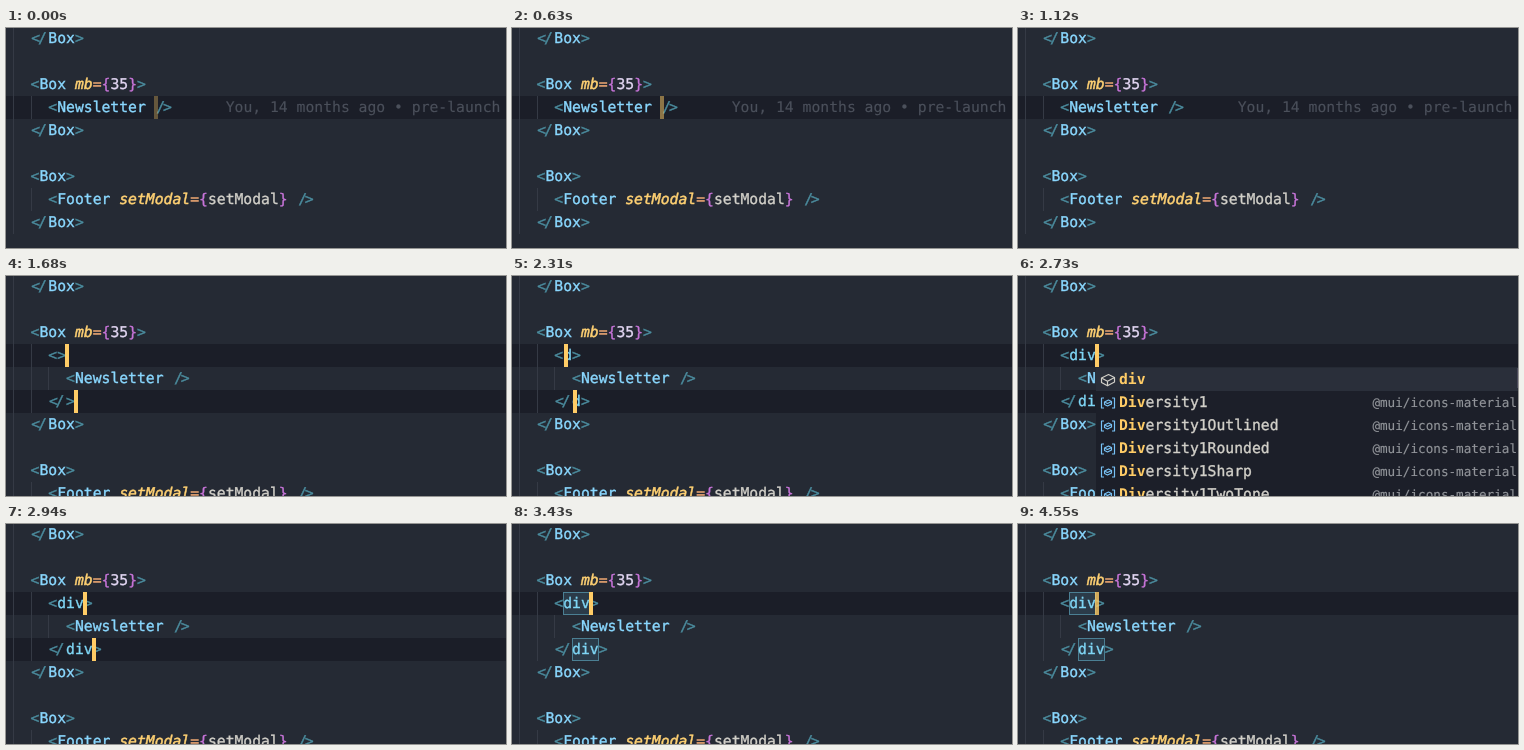
Write an HTML page that moves like this. It is 500x220 px and loops after 4620 ms.

```html
<!DOCTYPE html>
<html lang="en">
<head>
<meta charset="utf-8">
<title>Wrapping a component</title>
<style>
  html, body { margin: 0; width: 100%; height: 100%; overflow: hidden; background: #252a34; }
  #stage {
    position: relative; width: 500px; height: 220px; overflow: hidden;
    background: #252a34; color: #d2d0c9;
    font: 14.73px/23px "DejaVu Sans Mono", "Noto Sans Mono", monospace;
    text-rendering: geometricPrecision; font-variant-ligatures: none;
    -webkit-text-stroke: .35px;
  }
  #stage div, #stage svg { position: absolute; white-space: pre; box-sizing: border-box; }
  .band { left: 0; width: 500px; height: 23px; background: #1b1e28; }
  .guide { width: 1px; background: #353a45; }
  .punct { color: #4b8c9e; }
  .punct u { position: relative; text-decoration: none; }
  .brace { color: #c774d8; }
  .op { color: #eba672; }
  .comp { color: #8ad8ff; }
  .tag { color: #7fd6f5; }
  .attr { color: #ffd173; font-style: italic; -webkit-text-stroke: .5px; }
  .num { color: #e2d6f2; }
  .blame { color: #4b505b; -webkit-text-stroke: .15px; }
  .word { height: 23px; width: 27px; border: 1px solid #4b7f93; background: #2b3b49; }
  .caret { width: 4px; height: 23px; background: #ffcc66; }
  .popup { top: 92px; width: 431px; height: 140px; background: #1c1f29; }
  .item { left: 0; width: 431px; height: 23px; }
  .item.on { background: #2a2f3a; }
  .item svg { left: 4px; top: 4px; width: 16px; height: 16px; fill: none; stroke-width: 1.2; stroke-linejoin: round; }
  .label { left: 23px; }
  .label b { color: #ffcc66; -webkit-text-stroke: 0; }
  .detail { right: 10px; color: #92959a; font-size: 12.65px; -webkit-text-stroke: .15px; }
  .thumb { right: 0; top: 0; width: 10px; height: 20px; background: #4b4a5b; }
</style>
</head>
<body>
<div id="stage"></div>
<script>
const LOOP = 4620, TICK = 70, CHAR = 8.868, LEFT = 24.6, ROW = 23;
const stage = document.getElementById('stage');

// Each table holds [start in ms, value].
const tagName = [[0, null], [1610, ''], [2310, 'd'], [2450, 'di'], [2660, 'div']];
const caretCol = [[0, 12], [1610, 8], [1680, 2], [1750, 1], [2310, 1.2], [2380, 2],
  [2450, 2.25], [2520, 2.85], [2590, 3], [2660, 3.25], [2730, 4]];
const caretAlpha = [[0, .33], [70, 0], [560, .1], [630, .5], [700, .9], [770, 1],
  [980, .87], [1050, .33], [1120, 0], [1610, 1], [3780, .9], [3850, .5], [3920, .1],
  [3990, 0], [4480, .3], [4550, .8]];
const twoCarets = [[0, false], [1680, true], [3150, false]];
const popupKind = [[0, null], [2520, 'di'], [2730, 'div'], [2940, null]];
const wordBoxes = [[0, false], [3430, true]];

const PACKAGE = '@mui/icons-material';
const WHITE = '#d2d0c9', PURPLE = '#b180d7', BLUE = '#78c2f5';
const popups = {
  di: { col: 3, items: [['dialog', 'cube', WHITE], ['dispatchEvent', 'method', PURPLE],
    ['div', 'cube', BLUE], ...['', 'Outlined', 'Rounded'].map(s => icon('DialerSip' + s))] },
  div: { col: 4, items: [['div', 'cube', WHITE],
    ...['', 'Outlined', 'Rounded', 'Sharp', 'TwoTone'].map(s => icon('Diversity1' + s))] }
};
const shapes = {
  cube: 'M1.5 6 8.5 2.5 14.5 5.5V10L7.5 13.8 1.5 10.5ZM1.5 6 7.5 9.2 14.5 5.5M7.5 9.2V13.8',
  method: 'M8 1.8 13.5 5V11L8 14.2 2.5 11V5ZM2.5 5 8 8 13.5 5M8 8V14.2',
  value: 'M4 3H1.5V13H4M12 3H14.5V13H12M4.5 7 8.5 5 11.5 6.5V9L7.5 11 4.5 9.5ZM4.5 7 7.5 8.5 11.5 6.5'
};

function icon(name) { return [name, 'value', BLUE, PACKAGE]; }

function at(table, t) {
  let value;
  for (const [start, v] of table) if (start <= t) value = v;
  return value;
}

const x = col => LEFT + col * CHAR;
const y = row => row * ROW - 1;
const box = (cls, style, inner = '') => `<div class="${cls}" style="${style}">${inner}</div>`;
const place = (col, row) => `left:${x(col)}px;top:${y(row)}px;`;
const esc = s => s.replace(/</g, '&lt;').replace(/>/g, '&gt;');

const kinds = ['punct', 'brace', 'op', 'comp', 'tag', 'attr', 'num'];
const syntax = /(<\/|\/>|<|>)|([{}])|(=)|((?<=<\/?)[A-Z]\w*)|((?<=<\/?)[a-z]+)|(\w+(?==))|(\d+)/g;

// Paired punctuation sits closer together, as in a ligature.
function tight(s) {
  if (s.length < 2) return esc(s);
  const shift = s === '</' ? [.6, -1.6] : [1.6, -.6];
  return [...s].map((c, i) => `<u style="left:${shift[i]}px">${esc(c)}</u>`).join('');
}

function paint(text) {
  return text.replace(syntax, (m, ...groups) => {
    const i = groups.slice(0, kinds.length).findIndex(g => g !== undefined);
    return `<span class="${kinds[i]}">${i ? m : tight(m)}</span>`;
  });
}

function codeLines(tag) {
  const inner = tag === null
    ? [[2, '<Newsletter />']]
    : [[2, `<${tag}>`], [4, '<Newsletter />'], [2, `</${tag}>`]];
  return [[0, '</Box>'], [0, ''], [0, '<Box mb={35}>'], ...inner, [0, '</Box>'], [0, ''],
    [0, '<Box>'], [2, '<Footer setModal={setModal} />'], [0, '</Box>']];
}

function drawItem([name, shape, color, detail], i, typed) {
  return box('item' + (i ? '' : ' on'), `top:${i * ROW}px`,
    `<svg viewBox="0 0 16 16" stroke="${color}"><path d="${shapes[shape]}"/></svg>` +
    box('label', '', `<b>${name.slice(0, typed)}</b>${name.slice(typed)}`) +
    (detail ? box('detail', '', detail) : ''));
}

function drawPopup(kind) {
  const { col, items } = popups[kind];
  return box('popup', `left:${Math.round(x(2 + col))}px`,
    items.map((item, i) => drawItem(item, i, kind.length)).join('') + box('thumb', ''));
}

function draw(t) {
  const tag = at(tagName, t), col = at(caretCol, t), alpha = at(caretAlpha, t);
  const two = at(twoCarets, t), kind = at(popupKind, t);
  const lines = codeLines(tag);
  let html = box('band', `top:${y(3)}px`);
  if (two) html += box('band', `top:${y(5)}px`);

  lines.forEach(([indent], row) => {
    for (let c = -2; c < indent; c += 2)
      html += box('guide', `left:${Math.round(x(c))}px;top:${y(row)}px;height:${ROW}px`);
  });

  if (at(wordBoxes, t)) html += box('word', place(3, 3)) + box('word', place(4, 5));
  lines.forEach(([indent, text], row) => { html += box('', place(indent, row), paint(text)); });
  if (tag === null) html += box('blame', place(22, 3), 'You, 14 months ago • pre-launch');

  const caret = (c, row) => box('caret', place(c, row) + `margin-left:-.6px;opacity:${alpha}`);
  html += caret(2 + col, 3);
  if (two) html += caret(3 + col, 5);
  if (kind) html += drawPopup(kind);
  stage.innerHTML = html;
}

const start = performance.now();
let last = -1;
function loop() {
  const t = (performance.now() - start) % LOOP;
  const tick = Math.floor(t / TICK);
  if (tick !== last) draw((last = tick) * TICK);
  requestAnimationFrame(loop);
}
loop();
</script>
</body>
</html>
```
